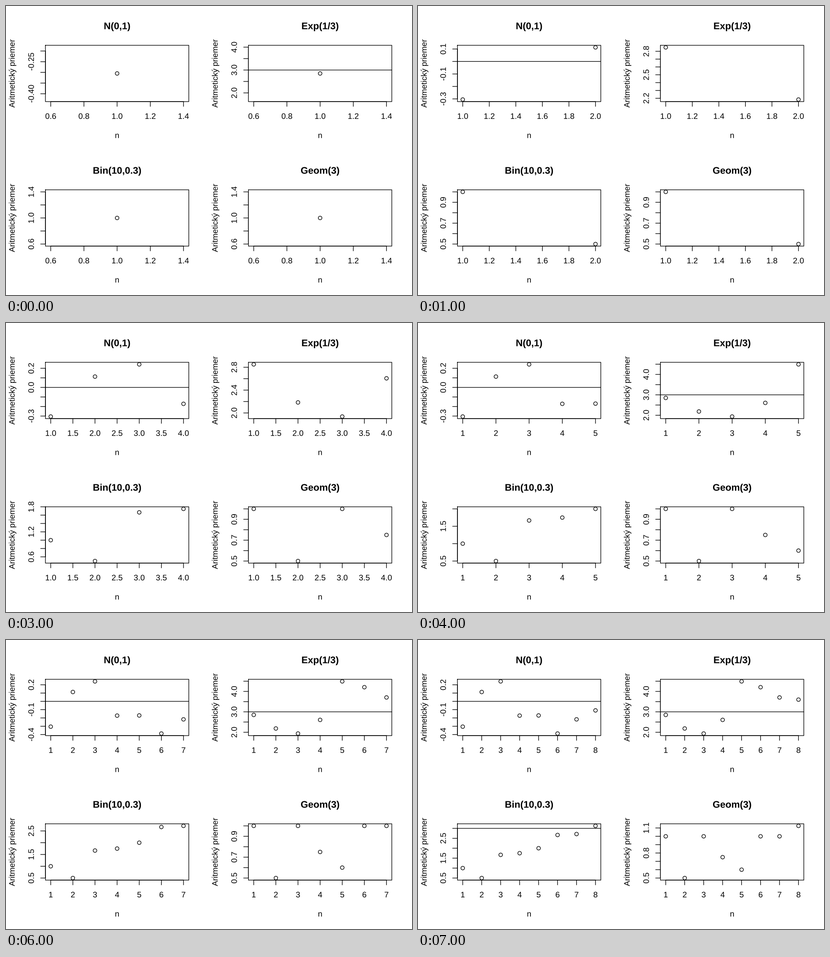
Animation, 885 px wide and 632 px high, one loop 8000 ms. Source, as a matplotlib script:

```python
import math

import matplotlib.pyplot as plt
from matplotlib.animation import FuncAnimation
from matplotlib.patches import Circle, PathPatch
from matplotlib.textpath import TextPath
from matplotlib.transforms import Affine2D

W, H, DPI = 885, 632, 100
LINE = 20.96                # height of one margin line, px
FONT = LINE / 1.2
STROKE = 1.31 * 72 / DPI
RADIUS = 3.95
LABEL_GAP = 15

# title, running means, expected value, column, row
PANELS = [
    ("N(0,1)", [-0.305, 0.113, 0.241, -0.172, -0.170, -0.388, -0.217, -0.109], 0, 0, 0),
    ("Exp(1/3)", [2.850, 2.184, 1.937, 2.606, 4.492, 4.207, 3.705, 3.598], 3, 1, 0),
    ("Bin(10,0.3)", [1, 1 / 2, 5 / 3, 7 / 4, 2, 16 / 6, 19 / 7, 25 / 8], 3, 0, 1),
    ("Geom(3)", [1, 1 / 2, 1, 3 / 4, 3 / 5, 1, 1, 9 / 8], 3, 1, 1),
]

fig = plt.figure(figsize=(W / DPI, H / DPI), dpi=DPI, facecolor="white")
ax = fig.add_axes([0, 0, 1, 1])
ax.set_xlim(0, W)
ax.set_ylim(H, 0)
ax.axis("off")

moving = []


def line(xs, ys):
    return ax.plot(xs, ys, color="black", lw=STROKE, solid_capstyle="round",
                   solid_joinstyle="round", snap=False)[0]


def outline(s, size=FONT, weight="normal"):
    return TextPath((0, 0), s, size=size,
                    prop={"family": "Liberation Sans", "weight": weight})


def advance(s, *style):
    """Width of a string including its side bearings."""
    return (outline(s + "n", *style).vertices[:, 0].max()
            - outline("n", *style).vertices[:, 0].max())


def text(x, y, s, *style, angle=0):
    """Text centred on x, y along its baseline, free of pixel rounding."""
    place = (Affine2D().translate(-advance(s, *style) / 2, 0)
             .scale(1, -1).rotate_deg(-angle).translate(x, y))
    shape = outline(s, *style).transformed(place)
    return ax.add_patch(PathPatch(shape, fc="black", lw=0, snap=False))


def frame_box(col, row):
    left, top = col * W / 2, row * H / 2
    return (left + 4.1 * LINE, top + 4.1 * LINE,
            left + W / 2 - 2.1 * LINE, top + H / 2 - 5.1 * LINE)


def limits(values):
    lo, hi = min(values), max(values)
    if lo == hi:
        pad = 0.4 * abs(lo)
        lo, hi = lo - pad, hi + pad
    edge = 0.04 * (hi - lo)
    return lo - edge, hi + edge


def pretty(lo, hi):
    """Round tick values inside the range, with their labels."""
    cell = (hi - lo) / 5
    base = 10 ** math.floor(math.log10(cell))
    step = base
    for factor, bias in ((2, 0.8), (5, 1.7), (10, 0.8)):
        if factor * base - cell >= bias * (cell - step):
            break
        step = factor * base
    first = math.ceil(lo / step - 1e-6)
    last = math.floor(hi / step + 1e-6)
    digits = max(0, -math.floor(math.log10(step) + 1e-9))
    ticks = [k * step for k in range(first, last + 1)]
    return ticks, [f"{t:.{digits}f}" for t in ticks]


def visible(positions, labels):
    """Skip labels that would crowd the one before."""
    end = -math.inf
    for pos, s in zip(positions, labels):
        half = advance(s) / 2
        if pos - half - end >= LABEL_GAP:
            end = pos + half
            yield pos, s


def draw_panel(panel, n):
    _, means, expected, col, row = panel
    x0, y0, x1, y1 = frame_box(col, row)
    xs, ys = range(1, n + 1), means[:n]
    xlo, xhi = limits(xs)
    ylo, yhi = limits(ys)

    def px(v):
        return x0 + (v - xlo) / (xhi - xlo) * (x1 - x0)

    def py(v):
        return y1 - (v - ylo) / (yhi - ylo) * (y1 - y0)

    for x, y in zip(xs, ys):
        dot = Circle((px(x), py(y)), RADIUS, fill=False, ec="black", lw=STROKE)
        moving.append(ax.add_patch(dot))

    ticks, labels = pretty(xlo, xhi)
    spots = [px(t) for t in ticks]
    moving.append(line([spots[0], spots[-1]], [y1, y1]))
    for x in spots:
        moving.append(line([x, x], [y1, y1 + LINE / 2]))
    for x, s in visible(spots, labels):
        moving.append(text(x, y1 + 1.8 * LINE, s))

    ticks, labels = pretty(ylo, yhi)
    spots = [py(t) for t in ticks]
    moving.append(line([x0, x0], [spots[0], spots[-1]]))
    for y in spots:
        moving.append(line([x0 - LINE / 2, x0], [y, y]))
    for y, s in visible([-y for y in spots], labels):
        moving.append(text(x0 - 1.2 * LINE, -y, s, angle=90))

    if ylo < expected < yhi:
        moving.append(line([x0, x1], [py(expected)] * 2))


def draw_fixed(panel):
    title, _, _, col, row = panel
    x0, y0, x1, y1 = frame_box(col, row)
    mid = (x0 + x1) / 2
    line([x0, x1, x1, x0, x0], [y0, y0, y1, y1, y0])
    text(mid, y0 - 35.2, title, LINE, "bold")
    text(mid, y1 + 3.8 * LINE, "n")
    text(x0 - 3.2 * LINE, (y0 + y1) / 2, "Aritmetický priemer", angle=90)


def update(i):
    while moving:
        moving.pop().remove()
    for panel in PANELS:
        draw_panel(panel, i + 1)
    return moving


for panel in PANELS:
    draw_fixed(panel)

anim = FuncAnimation(fig, update, frames=8, interval=1000, repeat=True,
                     repeat_delay=0, blit=False)
plt.show()
```
